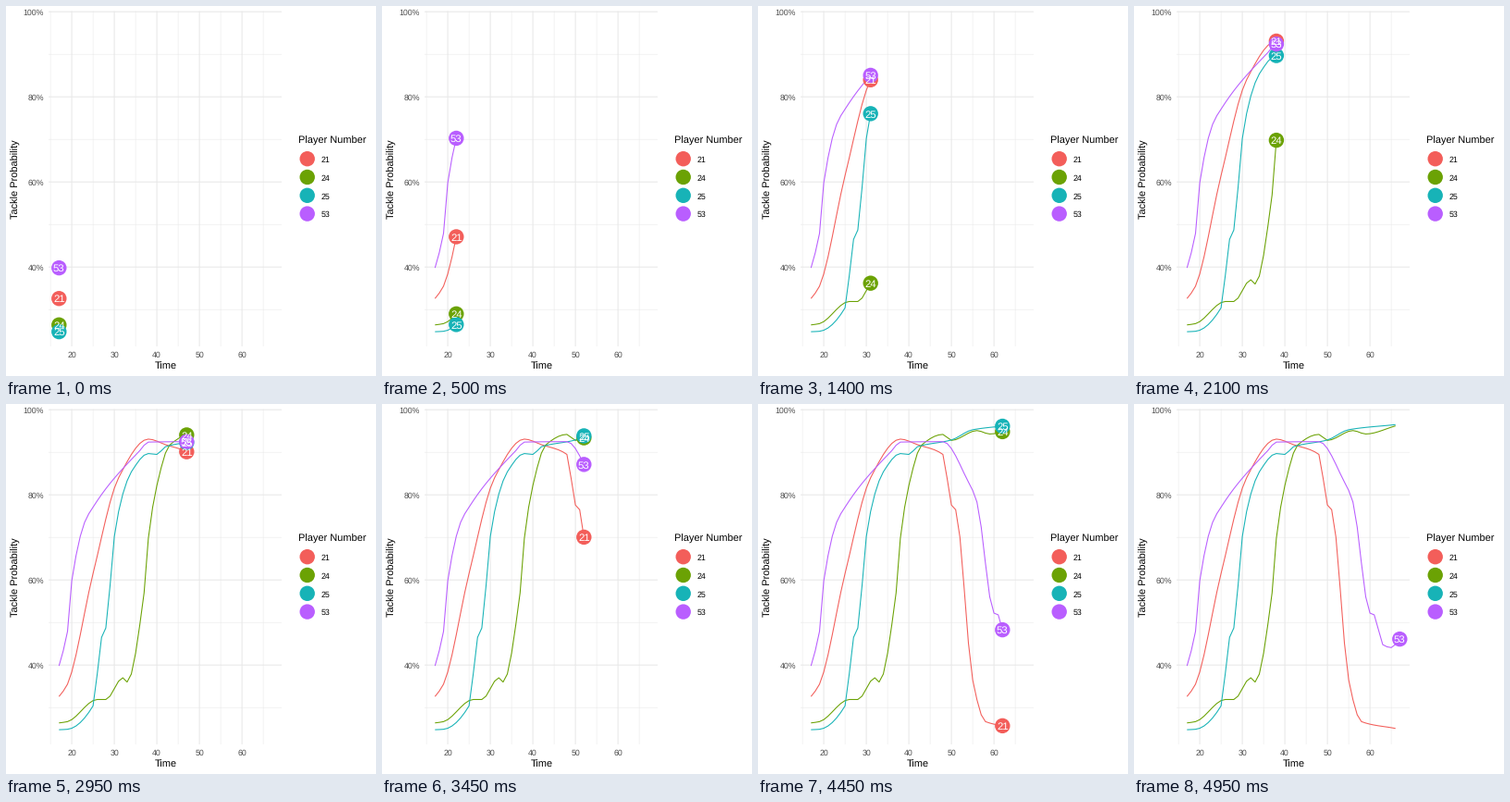
Recreate the animation shown at these times as a matplotlib script. Size 400 by 400 pixels, loop 5 s.

```python
import matplotlib.pyplot as plt
import numpy as np
from matplotlib.animation import FuncAnimation
from matplotlib.patches import Circle

plt.rcParams["font.family"] = "Liberation Sans"
plt.rcParams["text.hinting"] = "none"

SIZE, DPI = 400, 100
PT = 72 / DPI              # points per pixel
FRAMES, INTERVAL = 100, 50
START, END = 17, 67
LEFT, RIGHT, TOP, BOTTOM = 46, 298, 5.5, 368
RADIUS = 8.2

COLORS = {"21": "#F35E5A", "24": "#6BA204", "25": "#17B3B7", "53": "#B95EFF"}

# Bends of each curve as (time, percent)
BENDS = {
    "21": [(17, 32.6), (19, 35.5), (25, 61.5), (31, 84), (38, 93.1),
           (42, 91.8), (48, 89.5), (50, 77.6), (51, 76.5), (55, 36.5),
           (58, 26.7), (66, 25.1)],
    "24": [(17, 26.4), (19, 26.7), (26, 31.9), (28, 31.9), (32, 37),
           (33, 36), (37, 57), (38, 69.8), (40, 82.2), (43, 91.7),
           (48, 94.2), (50, 92.8), (56, 95.1), (59, 94.3), (66, 96.2)],
    "25": [(17, 24.8), (19, 24.9), (25, 30.4), (27, 46.5), (28, 48.7),
           (30, 70.2), (32, 80.2), (34, 85.4), (38, 89.7), (40, 89.5),
           (42, 91.3), (50, 92.9), (55, 95.3), (66, 96.5)],
    "53": [(17, 39.8), (19, 47.9), (20, 59.8), (23, 73.5), (25, 77.1),
           (29, 82.7), (36, 90.4), (38, 92.4), (48, 92.5), (54, 83),
           (56, 78.3), (60, 52.2), (61, 51.8), (63, 44.8), (65, 44.1),
           (67, 46.1)],
}

# Each time step lands on the nearest whole frame
STEPS = np.arange(START, END + 1)
KEYS = np.round((STEPS - START) * (FRAMES - 1) / (END - START))


def to_x(time):
    return 71.1 + (np.asarray(time) - 20) * 4.6


def to_y(percent):
    return 6.2 + (100 - np.asarray(percent)) * 4.6


def harmonic(a, b):
    return 2 * a * b / (a + b) if a * b > 0 else 0


def smooth(points):
    """Values at whole time steps on a monotone cubic through the points."""
    t, v = np.array(points, float).T
    gap = np.diff(t)
    rise = np.diff(v) / gap
    slope = np.array([rise[0], *map(harmonic, rise[:-1], rise[1:]), rise[-1]])
    times = STEPS[STEPS <= t[-1]]
    i = np.clip(np.searchsorted(t, times, side="right") - 1, 0, len(gap) - 1)
    u = (times - t[i]) / gap[i]
    ease = u * u * (3 - 2 * u)
    bend = u * (1 - u) * gap[i] * (slope[i] * (1 - u) - slope[i + 1] * u)
    return times, v[i] + (v[i + 1] - v[i]) * ease + bend


fig = plt.figure(figsize=(SIZE / DPI, SIZE / DPI), dpi=DPI, facecolor="white")
ax = fig.add_axes([0, 0, 1, 1])
ax.set_xlim(0, SIZE)
ax.set_ylim(SIZE, 0)
ax.axis("off")


def label(x, y, text, size, color="black", **kw):
    kw = {"ha": "left", "va": "baseline", **kw}
    return ax.text(x, y, text, fontsize=size * PT, color=color, **kw)


def grid(times, percents, width):
    style = dict(color="#E8E8E8", lw=width * PT, zorder=0, snap=False,
                 solid_capstyle="butt")
    for p in percents:
        ax.plot([LEFT, RIGHT], [to_y(p)] * 2, **style)
    for t in times:
        ax.plot([to_x(t)] * 2, [TOP, BOTTOM], **style)


def draw_axes():
    grid(range(15, 66, 10), range(30, 91, 20), 0.53)
    grid(range(20, 61, 10), range(40, 101, 20), 1.07)
    for t in range(20, 61, 10):
        label(to_x(t), 380, str(t), 8.8, "#4D4D4D", ha="center")
    for p in range(40, 101, 20):
        label(41.2, to_y(p) + 3.4, f"{p}%", 8.8, "#4D4D4D", ha="right")
    label(172.5, 393, "Time", 11, ha="center")
    label(11, 187.5, "Tackle Probability", 11, rotation=90,
          ha="center", va="center")


def draw_legend():
    label(315.5, 149.2, "Player Number", 11)
    for i, (name, color) in enumerate(COLORS.items()):
        y = 165.2 + 19.8 * i
        ax.add_patch(Circle((325.7, y), RADIUS, fc=color, lw=0))
        label(341, y + 3.8, name, 8.8)


class Player:
    def __init__(self, name, order):
        color = COLORS[name]
        self.times, self.values = smooth(BENDS[name])
        self.last = KEYS[len(self.times) - 1]
        self.line, = ax.plot([], [], color=color, lw=1.07 * PT,
                             solid_capstyle="butt", zorder=2 + order / 10)
        self.dot = ax.add_patch(Circle((0, 0), RADIUS, fc=color, lw=0,
                                       zorder=3 + order / 10))
        self.tag = label(0, 0, name, 11.4, "white", ha="center",
                         zorder=4 + order / 10)

    def update(self, frame):
        head = min(np.interp(frame, KEYS, STEPS), self.times[-1])
        value = np.interp(head, self.times, self.values)
        done = self.times < head
        x, y = to_x(head), to_y(value)
        self.line.set_data(np.append(to_x(self.times[done]), x),
                           np.append(to_y(self.values[done]), y))
        self.dot.center = x, y
        self.tag.set_position((x, y + 4.2))
        shown = frame <= self.last
        self.dot.set_visible(shown)
        self.tag.set_visible(shown)
        return [self.line, self.dot, self.tag]


draw_axes()
draw_legend()
players = [Player(name, i) for i, name in enumerate(COLORS)]


def update(frame):
    return [artist for p in players for artist in p.update(frame)]


anim = FuncAnimation(fig, update, frames=FRAMES, interval=INTERVAL,
                     repeat=True, repeat_delay=0, blit=False)
plt.show()
```
